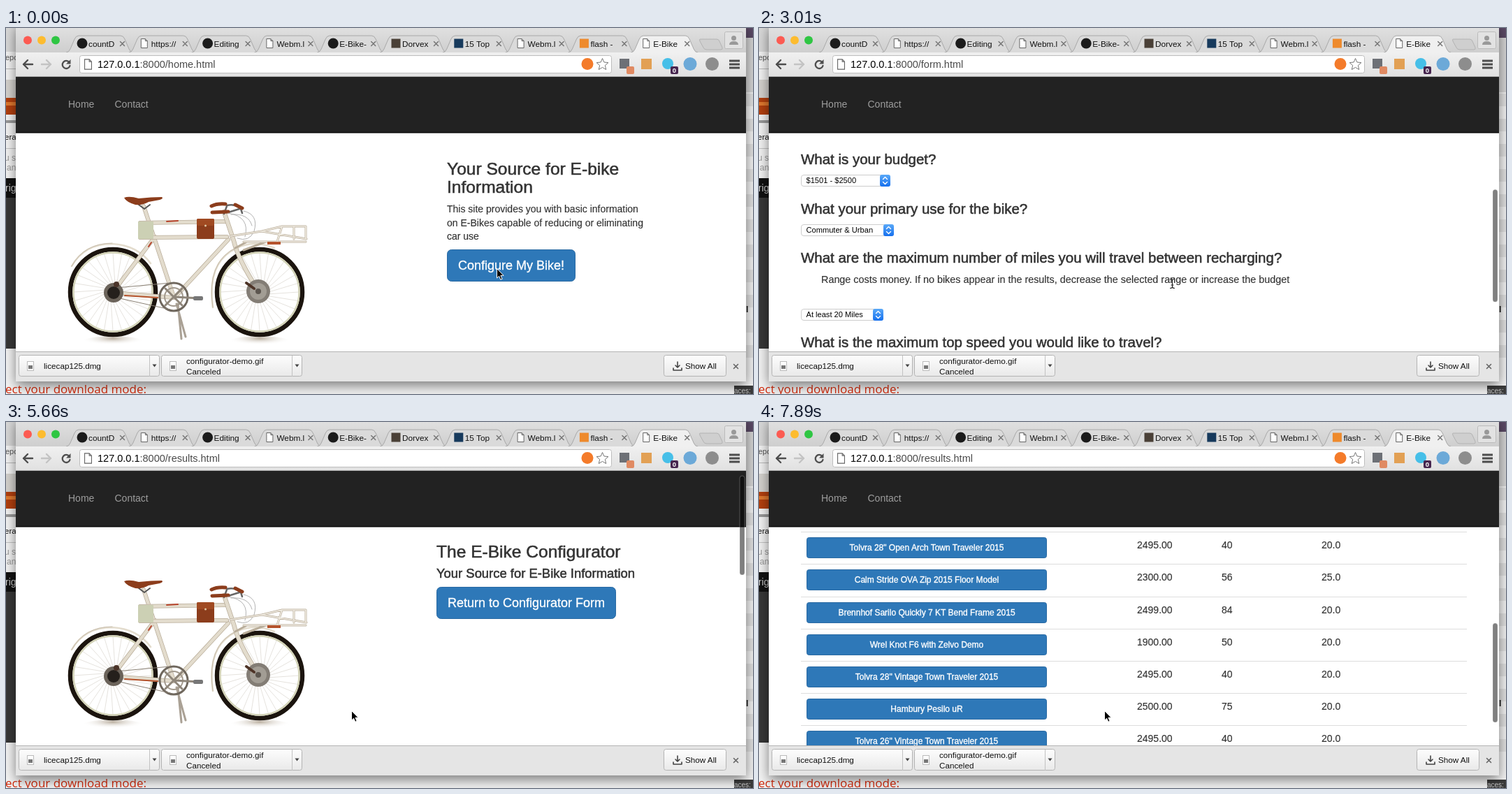
An HTML page for the animation above (8000 ms loop, 1069 by 524 pixels).

```html
<!DOCTYPE html>
<html lang="en">
<head>
<meta charset="utf-8">
<title>E-Bike Configurator</title>
<style>
html, body { margin: 0; width: 100%; height: 100%; overflow: hidden; background: #f4f4f4; }
svg { display: block; }
text { font-family: "Liberation Sans", Arial, sans-serif; white-space: pre; }
.med { stroke: #333; stroke-width: .55px; }
.lit { stroke: #fff; stroke-width: .35px; }
.body { stroke: #333; stroke-width: .15px; }
.shadow { filter: drop-shadow(0 6px 9px rgba(0, 0, 0, .5)); }
.line { fill: none; stroke-linecap: round; stroke-linejoin: round; }
</style>
</head>
<body>
<svg id="stage" width="1069" height="524" viewBox="0 0 1069 524">
  <defs>
    <linearGradient id="strip" x2="0" y2="1"><stop stop-color="#e0e0e0"/><stop offset="1" stop-color="#cecece"/></linearGradient>
    <linearGradient id="bar" x2="0" y2="1"><stop stop-color="#f0f0f0"/><stop offset="1" stop-color="#e1e1e1"/></linearGradient>
    <linearGradient id="chip" x2="0" y2="1"><stop stop-color="#fdfdfd"/><stop offset="1" stop-color="#e9e9e9"/></linearGradient>
    <linearGradient id="blue" x2="0" y2="1"><stop stop-color="#5aa9f8"/><stop offset="1" stop-color="#1670ee"/></linearGradient>
    <radialGradient id="ground" cy=".2"><stop stop-color="#a3947f" stop-opacity=".75"/><stop offset="1" stop-color="#fff" stop-opacity="0"/></radialGradient>
    <clipPath id="view"><rect x="14" y="70" width="1045" height="393"/></clipPath>
  </defs>
</svg>
<script>
const stage = document.getElementById('stage');

// Markup helpers
const text = (x, y, size, str, fill = '#333', extra = '') =>
  `<text x="${x}" y="${y}" font-size="${size}" fill="${fill}" ${extra}>${str}</text>`;
const rect = (x, y, w, h, fill, extra = '') =>
  `<rect x="${x}" y="${y}" width="${w}" height="${h}" fill="${fill}" ${extra}/>`;
const disc = (x, y, r, fill, extra = '') =>
  `<circle cx="${x}" cy="${y}" r="${r}" fill="${fill}" ${extra}/>`;
const line = (d, color, width = 1) =>
  `<path class="line" d="${d}" stroke="${color}" stroke-width="${width}"/>`;
const heading = (x, y, size, str, extra = '') =>
  text(x, y, size * 1.024, str, '#333', `class="med" ${extra}`);
const body = (x, y, str, size = 14) => text(x, y, size, str, '#333', 'class="body"');
const repeat = (n, fn) => Array.from({ length: n }, (_, i) => fn(i)).join('');

function button(x, y, w, label) {
  return rect(x + .5, y + .5, w - 1, 45, '#2e78b8', 'rx="6" stroke="#2a6aa3"') +
    text(x + w / 2, y + 29, 18, label, '#fff', 'class="lit" text-anchor="middle"');
}

function select(y, w, label) {
  const x = 60 + w - 15, c = x + 7.5;
  return rect(60.5, y + .5, w - 1, 16, '#fff', 'rx="3.5" stroke="#cdcdcd"') +
    rect(x, y, 15, 17, 'url(#blue)', 'rx="3"') +
    line(`M${c - 3} ${y + 6.5}l3-3 3 3M${c - 3} ${y + 10.5}l3 3 3-3`, '#fff', 1.4) +
    text(67.5, y + 12, 11.1, label, '#000');
}

function wheel(x, y) {
  const spokes = repeat(28, i => {
    const a = i * Math.PI / 14, b = a + .25;
    return `M${x + 12 * Math.cos(b)} ${y + 12 * Math.sin(b)}L${x + 56 * Math.cos(a)} ${y + 56 * Math.sin(a)}`;
  });
  return `<ellipse cx="${x}" cy="${y + 72}" rx="46" ry="9" fill="url(#ground)"/>` +
    line(spokes, '#d3cec6', .6) +
    disc(x, y, 61, 'none', 'stroke="#1b140e" stroke-width="6.5"') +
    disc(x, y, 56.5, 'none', 'stroke="#d2d2b6" stroke-width="2.5"');
}

function bike() {
  const cream = '#e3dccd', shade = '#b9ad9a', brown = '#8c3d1c';
  const frame = 'M153 363L213 284M153 364L240 371M197 240L240 370M318 288L244 368';
  const tubes = 'M192 264L314 262M192 285L316 284';
  const fork = 'M312 248L326 290Q332 316 361 361';
  const rack = 'M321 283L366 276L430 287M340 291H429M366 276L395 269H429V286M412 269V287M395 269L388 291';
  return wheel(153, 363) + wheel(363, 363) +
    line('M94 326Q112 294 152 294Q188 296 207 322M296 385Q287 320 330 300Q356 288 384 300', cream, 2.5) +
    line('M94 326Q112 293 152 293M296 385Q286 320 330 299', shade, .7) +
    line('M246 380L251 430M244 380L257 427', '#aaa195', 3) +
    line(frame, shade, 6) + line(frame, cream, 4.5) +
    line(tubes, shade, 6) + line(tubes, cream, 4.5) +
    line(fork, shade, 6.5) + line(fork, cream, 5) +
    rect(189, 262, 22, 25, '#ccd0b4', 'rx="1"') +
    rect(273, 258, 25, 29, brown, 'rx="2"') + rect(273, 258, 25, 10, '#a04a22', 'rx="2"') +
    disc(285.5, 268, 1.5, '#e0c9a4') +
    line('M230 262l16-1M204 298l4-6', '#b8452d', 2) +
    line('M190 238l8 6 8-6', '#555', 2) +
    `<path d="M169 228Q176 225 190 229Q208 227 223 227Q226 229 220 231L204 234Q196 239 185 238Q172 234 169 228Z" fill="${brown}"/>` +
    line('M312 251L316 240M316 239Q328 236 336 244L338 250M318 249L334 244', '#666', 2.5) +
    line('M294 240Q302 236 314 237M295 249L318 248M328 238L338 243', brown, 5) +
    line('M340 247Q362 252 355 276Q348 292 331 286M318 250Q350 255 342 284M322 252Q347 250 352 268', '#aaa', .9) +
    line(rack + 'M345 291L328 300M372 291L340 303', shade, 3) + line(rack, '#eee9df', 1.7) +
    rect(374, 291, 19, 4, '#b5532c') +
    disc(240, 370, 20, 'none', 'stroke="#6f675d" stroke-width="3"') +
    disc(240, 370, 13, 'none', 'stroke="#a39a8e" stroke-width="2"') +
    line('M240 370L278 372M228 358L252 382M252 358L228 382', '#8f867a', 3) +
    rect(268, 369, 14, 6, '#777', 'rx="2"') +
    line('M158 357L235 350M158 371L235 388', '#8a8175', 1) +
    line('M170 368L217 371', '#b5532c', 2) +
    disc(154, 364, 14, '#6b635a') + disc(154, 364, 9, '#25201c') + disc(158, 352, 4, '#4b3429') +
    disc(361, 362, 17, '#837d75') + disc(361, 362, 12, '#a29d94') + disc(361, 362, 4, '#5c564f') +
    line('M344 350l11 8', '#4d3326', 4);
}

const home = `<g transform="translate(0 15)">${bike()}</g>` +
  heading(631, 209.5, 24, 'Your Source for E-bike') + heading(631, 235.5, 24, 'Information') +
  body(631, 263.5, 'This site provides you with basic information') +
  body(631, 283.5, 'on E-Bikes capable of reducing or eliminating') +
  body(631, 303, 'car use') + button(631, 317, 184, 'Configure My Bike!');

const intro = bike() + heading(616, 193.5, 24, 'The E-Bike Configurator') +
  heading(616, 223, 18, 'Your Source for E-Bike Information');

const form = intro + button(616, 236, 205, 'Return to Home Page') +
  '<g transform="translate(0 360)">' +
  heading(60, 194.5, 20, 'What is your budget?') + select(210, 128, '$1501 - $2500') +
  heading(60, 265.5, 20, 'What your primary use for the bike?') + select(281, 133, 'Commuter &amp; Urban') +
  heading(60, 336, 20, 'What are the maximum number of miles you will travel between recharging?') +
  body(89, 364.5, 'Range costs money. If no bikes appear in the results, decrease the selected range or increase the budget', 14.38) +
  select(402, 118, 'At least 20 Miles') +
  heading(60, 457, 20, 'What is the maximum top speed you would like to travel?') +
  body(89, 485.5, 'Rated top speeds are under ideal conditions of flat terrain, no headwind, rider weight of 150lbs or less and full battery charge', 14.42) +
  select(523, 111, 'At least 15 MPH') + button(60, 559, 195, 'Submit Questionaire') + '</g>';

const models = [
  ['Calm Stride OVA Fen Mild 2015', '2000.00', 55, '25.0'],
  ['Tolvra 26" Open Arch Town Traveler 2015', '2495.00', 40, '20.0'],
  ['Tolvra 28" Open Arch Town Traveler 2015', '2495.00', 40, '20.0'],
  ['Calm Stride OVA Zip 2015 Floor Model', '2300.00', 56, '25.0'],
  ['Brennhof Sarilo Quickly 7 KT Bend Frame 2015', '2499.00', 84, '20.0'],
  ['Wrel Knot F6 with Zelvo Demo', '1900.00', 50, '20.0'],
  ['Tolvra 28" Vintage Town Traveler 2015', '2495.00', 40, '20.0'],
  ['Hambury Pesilo uR', '2500.00', 75, '20.0'],
  ['Tolvra 26" Vintage Town Traveler 2015', '2495.00', 40, '20.0'],
];
const columns = [541, 662, 805];
const rule = y => rect(60, y, 953, 1, '#ddd');

function row([name, ...cells], i) {
  const y = 626 + Math.round(46.15 * i);
  return rule(y) +
    rect(68.5, y + 8.5, 343, 29, '#2e78b8', 'rx="3" stroke="#2a6aa3"') +
    text(240, y + 27, 12, name, '#fff', 'class="lit" text-anchor="middle"') +
    cells.map((c, k) => body(columns[k], y + 23.5, c)).join('');
}

const bold = (x, y, str) => text(x, y, 14, str, '#333', 'font-weight="700"');
const results = intro + button(616, 236, 257, 'Return to Configurator Form') +
  heading(536.5, 557, 20, 'Matching Bike Results', 'text-anchor="middle"') + rule(570) +
  bold(68, 593, 'Bike Model') + bold(541, 593, 'Price') + bold(541, 613, 'USD') +
  bold(662, 593, 'Range') + bold(662, 613, 'Miles') + bold(805, 593, 'Max Speed') +
  models.map(row).join('');

// Windows behind the browser
function backdrop() {
  return rect(0, 0, 1069, 524, '#f4f4f4') + rect(0, 0, 1069, 34, '#d9d9d9') +
    text(-1, 46, 11, 'epo', '#555') + rect(0, 58, 14, 1, '#bbb') +
    rect(0, 74, 14, 26, '#d5d3cf') + rect(0, 100, 14, 24, '#b3400f') + rect(0, 106, 14, 5, '#e0792f') +
    rect(0, 132, 14, 4, '#999') + text(-2, 160, 11.5, 'erag', '#111') + rect(0, 172, 14, 1, '#c4c4c4') +
    text(-2, 190, 12, 'u s', '#999') + text(1, 204, 12, 'an', '#999') +
    rect(0, 215, 14, 28, '#111') + text(-1, 234, 14, 'rig', '#ccc') + rect(0, 243, 14, 216, '#383838') +
    text(-1, 522.5, 17, 'ect your download mode:', '#d42a0c', 'style="font-family:\'Open Sans\',sans-serif"') +
    rect(1059, 0, 10, 14, '#5b4a66') + rect(1059, 14, 10, 78, '#d6d6d6') +
    repeat(11, i => rect(1059, 94 + 36 * i, 10, 18, '#e2e2e2')) +
    text(1059, 407, 12, 'l', '#111', 'font-weight="700"') +
    rect(1042, 512, 27, 12, '#3b3b3b') + text(1042, 523, 10, 'aces:', '#ccc');
}

const tabs = ['countD', 'https://', 'Editing', 'Webm.l', 'E-Bike-', 'Dorvex', '15 Top', 'Webm.l', 'flash -', 'E-Bike'];
const icons = ['#1b1b1b', '', '#1b1b1b', '', '#1b1b1b', '#4a4037', '#173a5c', '', '#ee8a2c', ''];
const pageIcon = (x, y, s = 1) =>
  `<path transform="translate(${x} ${y}) scale(${s})" d="M-4.5-6.5H1.5L4.5-3.5V6.5H-4.5ZM1.5-6.5V-3.5H4.5" fill="#fff" stroke="#666"/>`;

function tab(title, i) {
  const x = 89.8 * i, active = i === 9, color = icons[i];
  const icon = !color ? pageIcon(x + 108, 22) :
    i < 5 ? disc(x + 109, 22, 7.5, color) : rect(x + 102.5, 15.5, 13, 13, color);
  return `<path d="M${x + 86} 35q4 0 6-5l6-14q2-5 6-5h60q4 0 6 5l6 14q2 5 6 5" fill="${active ? '#f0f0f0' : '#dadada'}" stroke="#a9a9a9"/>` +
    icon + `<svg x="${x + 118}" y="10" width="41" height="24">${text(0, 16.5, 11.8, title, '#111')}</svg>` +
    line(`M${x + 163.5} 19.5l6 6m0-6l-6 6`, '#777', 1.5);
}

function toolbar() {
  return rect(14, 35, 1045, 34, 'url(#bar)') + rect(14, 69, 1045, 1, '#aaa') +
    line('M38 52H25M31 46l-6 6 6 6', '#4d4d4d', 2.4) + line('M51 52H64M58 46l6 6-6 6', '#c3c3c3', 2.4) +
    line('M90.5 49A5.5 5.5 0 1 0 91.5 54', '#4d4d4d', 2.3) + '<path d="M92.5 45v6.5h-6.5z" fill="#4d4d4d"/>' +
    rect(105.5, 39.5, 761, 25, '#fff', 'rx="3" stroke="#bdbdbd"') + pageIcon(117.5, 52, 1.1) +
    '<text x="131" y="57" font-size="14.5" fill="#4a4a4a"><tspan fill="#000">127.0.0.1</tspan>:8000/<tspan id="file"></tspan></text>' +
    disc(832, 51.5, 8.5, '#f47b2a') +
    '<path d="M853.5 43.5l2.4 5.5 6 .6-4.5 4 1.3 5.9-5.2-3.1-5.2 3.1 1.3-5.9-4.5-4 6-.6z" fill="#fff" stroke="#777"/>' +
    rect(878, 44, 14, 14, '#6d7076') + rect(888, 55, 11, 11, '#e08a62', 'rx="2"') +
    rect(909, 44, 15, 15, '#e2a054') +
    disc(947, 51, 8, '#46bfe8') + rect(951, 55, 11, 11, '#47264f', 'rx="2"') +
    text(956.5, 64, 9.5, '0', '#fff', 'font-weight="700" text-anchor="middle"') +
    disc(979, 51.5, 9.5, '#6ca9d8') + disc(1010.5, 51.5, 9.5, '#8d8d8d') +
    repeat(3, i => rect(1035, 45.5 + 5 * i, 15, 3, '#4d4d4d'));
}

const chip = (x, w) => rect(x + .5, 468.5, w, 30, 'url(#chip)', 'rx="3" stroke="#b4b4b4"');
const download = x => chip(x, 201) + rect(x + 187, 469, 1, 30, '#c2c2c2') +
  `<path d="M${x + 191.5} 481.5h6l-3 4z" fill="#444"/>` +
  rect(x + 12.5, 477.5, 9, 13, '#fff', 'stroke="#bbb"') + rect(x + 14, 483, 6, 5, '#777');

const shelf = () => rect(14, 463, 1045, 43, '#e5e5e5') + rect(14, 463, 1045, 1, '#b4b4b4') +
  download(18) + text(54, 487.5, 11.7, 'licecap125.dmg', '#111') +
  download(222) + text(258, 481, 11.7, 'configurator-demo.gif', '#111') + text(258, 496, 11.7, 'Canceled', '#111') +
  chip(941, 89) + text(972, 487.5, 11.7, 'Show All', '#111') +
  line('M961 478v7M958 483l3 3 3-3M955 487v3h12v-3', '#444', 1.6) +
  line('M1041.5 481.5l6 6m0-6l-6 6', '#666', 1.6);

stage.insertAdjacentHTML('beforeend', backdrop() +
  rect(14, -6, 1045, 512, '#e5e5e5', 'rx="4" class="shadow"') + rect(14, 0, 1045, 35, 'url(#strip)') +
  ['#fc5b52', '#fdbc2f', '#2fc643'].map((c, i) => disc(31 + 20 * i, 17.5, 6, c)).join('') +
  '<path d="M993 16h24q3 0 4 3l4 9q1 3-2 3h-20q-4 0-5-3l-5-9q-1-3 0-3z" fill="#cfcfcf" stroke="#b3b3b3"/>' +
  rect(1028.5, 5.5, 26, 24, '#e2e2e2', 'rx="2" stroke="#bbb"') +
  disc(1041.5, 14.5, 3.5, '#999') + '<path d="M1035 24q0-5 6.500-5t6.500 5z" fill="#999"/>' +
  tabs.map(tab).join('') + toolbar() +
  '<g clip-path="url(#view)">' + rect(14, 70, 1045, 393, '#fff') +
  [home, form, results].map(p => `<g class="page">${p}</g>`).join('') +
  '<g id="nav">' + rect(14, 64, 1045, 85, '#222') + rect(14, 149, 1045, 1.5, '#080808') +
  text(89, 114, 14, 'Home', '#9d9d9d') + text(155.5, 114, 14, 'Contact', '#9d9d9d') + '</g>' +
  rect(1050, 0, 7, 10, 'rgba(0,0,0,.5)', 'id="thumb" rx="3.5" stroke="#fff" stroke-opacity=".25"') +
  '</g>' + shelf() +
  '<path id="arrow" d="M0 0V13.500L3.100 10.700 5.300 15.800 7.600 14.800 5.400 9.800H9.600Z" fill="#000" stroke="#fff"/>' +
  '<g id="beam">' + line('M-3-6.500Q0-6.500 0-4.500Q0-6.500 3-6.500M0-5V5M-3 6.500Q0 6.500 0 4.500Q0 6.500 3 6.500M-1.500 2H1.500', '#222', 1.2) + '</g>');

// Motion: bursts of steps as [start, end, count], then keys as [time, value...]
const LOOP = 8000;
const bursts = [[0, 0, 1], [500, 1230, 6], [1530, 2570, 8], [2720, 3750, 8],
  [3900, 4050, 2], [4340, 5370, 8], [5660, 6700, 8], [6850, 7890, 8]];
const scrollKeys = [[1830, 0], [1980, 70], [2280, 235], [2570, 345], [2720, 356], [2860, 360], [3010, 360],
  [3300, 455], [3450, 521], [4629, 521], [4630, 0], [5660, 0], [5810, 25], [5960, 88], [6250, 245],
  [6400, 292], [6550, 308], [6700, 311], [6850, 325], [7300, 465], [7600, 540], [7890, 560.5]];
const bounceKeys = [[3300, 0], [3450, 6], [3600, 3], [3750, 1], [3900, 0]];
const cursorKeys = [[1380, 702.5, 344.5], [1830, 671.5, 365.5], [2570, 671.5, 365.5], [2860, 591.5, 366],
  [3300, 591.5, 366], [3750, 245.5, 397], [4050, 200, 420], [4630, 200, 420], [5370, 494.5, 413.5]];

function snap(t) {
  const [a, b, n] = bursts.filter(s => s[0] <= t).pop();
  if (n === 1) return a;
  const gap = (b - a) / (n - 1);
  const k = Math.min(n - 1, Math.floor((t - a) / gap + .05));
  return Math.round((a + k * gap) / 10) * 10;
}

function at(keys, t, col = 1) {
  const i = keys.findIndex(k => k[0] > t);
  if (i === 0) return keys[0][col];
  if (i < 0) return keys[keys.length - 1][col];
  const p = keys[i - 1], q = keys[i];
  return p[col] + (q[col] - p[col]) * (t - p[0]) / (q[0] - p[0]);
}

const el = id => document.getElementById(id);
const pages = [...document.querySelectorAll('.page')];
const files = ['home.html', 'form.html', 'results.html'];
const [nav, thumb, arrow, beam, file] = ['nav', 'thumb', 'arrow', 'beam', 'file'].map(el);
const show = (node, on) => node.setAttribute('visibility', on ? 'visible' : 'hidden');
const move = (node, x, y) => node.setAttribute('transform', `translate(${x} ${y})`);

function draw(time) {
  const t = snap(time % LOOP);
  const page = t < 790 ? 0 : t < 4630 ? 1 : 2;
  const scroll = at(scrollKeys, t), bounce = at(bounceKeys, t);
  pages.forEach((p, i) => show(p, i === page));
  move(pages[page], 0, -Math.round(scroll + bounce));
  move(nav, 0, -Math.round(bounce));
  file.textContent = files[page];

  show(thumb, (t >= 1980 && t < 4340) || t >= 5660);
  thumb.setAttribute('y', 77 + scroll / (page === 2 ? 2.655 : 2.335));
  thumb.setAttribute('height', page === 2 ? 142 : 161);

  const overText = t >= 2860 && t < 3450;
  const x = at(cursorKeys, t), y = at(cursorKeys, t, 2);
  show(arrow, !overText);
  show(beam, overText);
  move(arrow, x, y);
  move(beam, x, y);
}

const start = performance.now();
function tick() {
  draw(performance.now() - start);
  requestAnimationFrame(tick);
}
tick();
</script>
</body>
</html>
```
